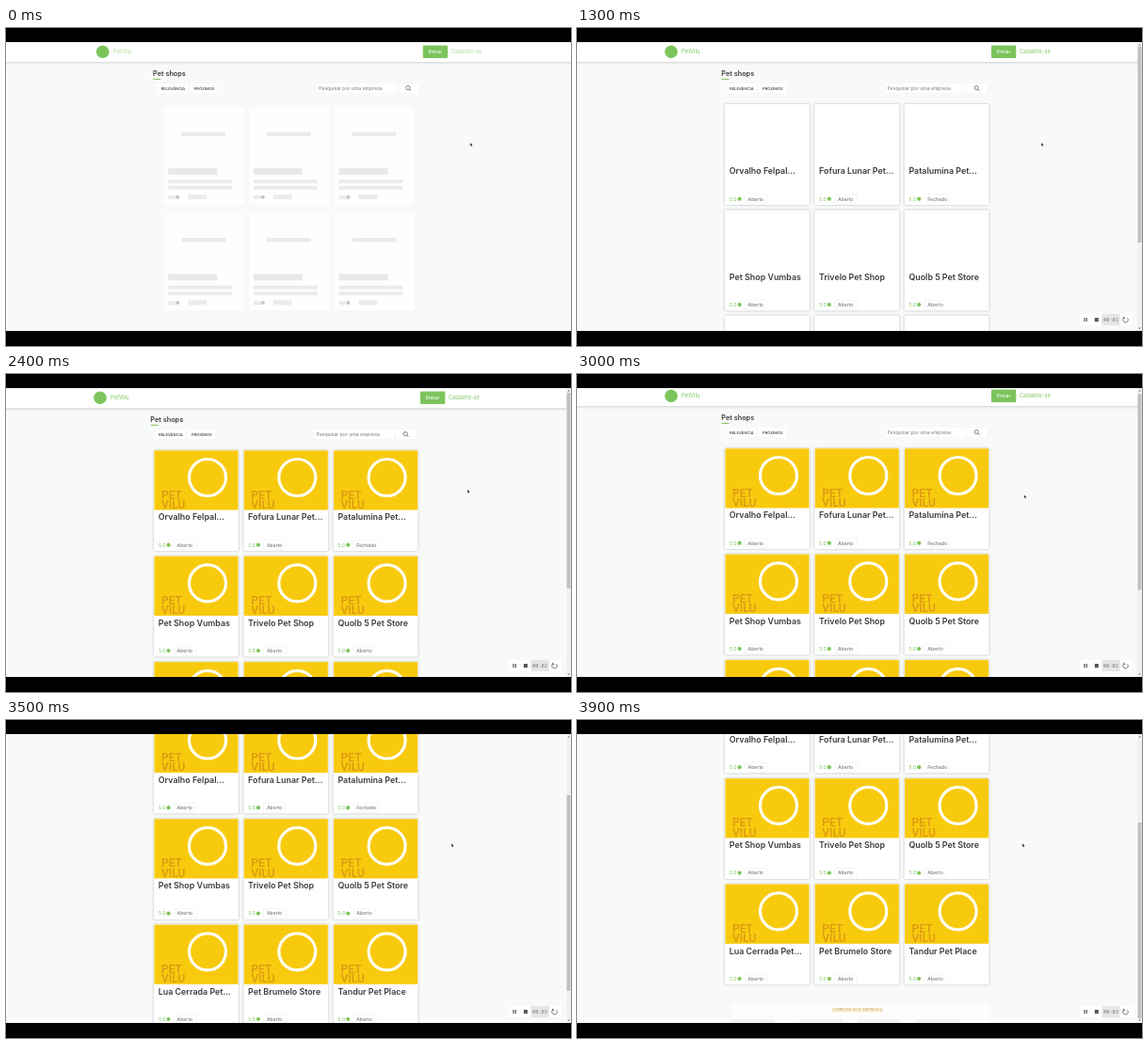
Write an HTML page that moves like this. It is 600 by 338 pixels and loops after 4 s.

```html
<!DOCTYPE html>
<html lang="pt-BR">
<head>
<meta charset="utf-8">
<title>Pet shops</title>
<style>
html, body { margin: 0; width: 100%; height: 100%; overflow: hidden; background: #000; }
svg { display: block; width: 100%; height: 100%; }
text { font-family: Inter, "Open Sans", sans-serif; }
.brand { font-family: Roboto, "Liberation Sans", sans-serif; }
.mono { font-family: "Noto Sans Mono", "DejaVu Sans Mono", monospace; }
.card { filter: drop-shadow(0 .3px 1px rgba(0, 0, 0, .28)); }
.bar { filter: drop-shadow(0 1px 1.5px rgba(0, 0, 0, .16)); }
.soft { filter: drop-shadow(0 0 .6px rgba(0, 0, 0, .08)); }
</style>
</head>
<body>
<svg viewBox="0 0 600 338" xmlns="http://www.w3.org/2000/svg">
  <defs><clipPath id="view"><rect y="15" width="600" height="307"/></clipPath></defs>
  <rect width="600" height="338"/>
  <g clip-path="url(#view)">
    <rect y="15" width="600" height="307" fill="#f8faf9"/>
    <g id="page"></g>
    <g id="scrollbar"></g>
    <g id="panel"></g>
    <path id="cursor" d="M0 0V3.6L.9 2.8 1.5 4.1 2.1 3.8 1.5 2.6H2.6Z" fill="#111" stroke="#fff" stroke-width=".2"/>
  </g>
</svg>
<script>
const LOOP = 4000, STEP = 100;
const PANEL_AT = 300, CARDS_AT = 1100, IMAGES_AT = 1700;
const GREEN = '#7cc45c', DARK = '#3c3c3c';
const SHOPS = [
  'Orvalho Felpal...', 'Fofura Lunar Pet...', 'Patalumina Pet...',
  'Pet Shop Vumbas', 'Trivelo Pet Shop', 'Quolb 5 Pet Store',
  'Lua Cerrada Pet...', 'Pet Brumelo Store', 'Tandur Pet Place'
];
const $ = id => document.getElementById(id);
const clamp = v => Math.max(0, Math.min(1, v));

const rect = (x, y, w, h, fill, more = '') =>
  `<rect x="${x}" y="${y}" width="${w}" height="${h}" fill="${fill}" ${more}/>`;
const dot = (x, y, r, fill, more = '') =>
  `<circle cx="${x}" cy="${y}" r="${r}" fill="${fill}" ${more}/>`;
const text = (x, y, size, fill, str, more = '') =>
  `<text x="${x}" y="${y}" font-size="${size}" fill="${fill}" ${more}>${str}</text>`;

function header() {
  return rect(-10, 0, 620, 36, '#fff', 'class="bar"') +
    dot(100, 25.2, 6.8, GREEN) +
    `<g id="faint">${text(111, 27.2, 5.9, GREEN, 'PetVilu')}
      ${text(470, 27, 5.6, GREEN, 'Cadastre-se')}</g>` +
    rect(440, 18.5, 26.3, 13.5, GREEN, 'rx="1"') +
    text(453.2, 27, 5, '#fff', 'Entrar', 'text-anchor="middle" font-weight="500"');
}

function toolbar() {
  return text(153.3, 51.4, 7.3, DARK, 'Pet shops', 'font-weight="600"') +
    rect(153.5, 53.9, 8, 1, GREEN) +
    rect(158.5, 58.7, 32, 10.8, '#fff', 'class="soft"') +
    rect(193, 58.7, 29, 10.8, '#fff', 'class="soft"') +
    text(162, 65.7, 4.1, DARK, 'RELEVÂNCIA', 'font-weight="500"') +
    text(197, 65.7, 4.1, DARK, 'PRÓXIMOS', 'font-weight="500"') +
    rect(326.5, 58.7, 86, 10.8, '#fff', 'class="soft"') +
    rect(414, 58.7, 21.5, 10.8, '#fff', 'class="soft"') +
    text(329.5, 66, 5.1, '#777', 'Pesquisar por uma empresa') +
    `<g fill="none" stroke="#555" stroke-width=".7"><circle cx="424.2" cy="63.6" r="2.1"/>
      <path d="M425.7 65.1L427.6 67"/></g>`;
}

function picture() {
  return `<g class="pic">${rect(.5, .3, 89, 63.2, '#f8ca0e')}
    ${dot(57, 29, 19.5, 'none', 'stroke="#fffdf2" stroke-width="3.2"')}
    <g class="brand" font-weight="500">
    ${text(8, 51.5, 12, '#dc9812', 'PET', 'class="brand"')}
    ${text(8, 61.8, 12, '#dc9812', 'VILU', 'class="brand"')}</g></g>`;
}

function card(name, i) {
  const x = 157 + i % 3 * 95.3, y = 81 + Math.floor(i / 3) * 112.4;
  const closed = i === 2;
  return `<g transform="translate(${x} ${y})">` +
    rect(0, 0, 90, 107, '#fff', 'rx="1" class="card"') + picture() +
    text(4.8, 74.3, 8.9, DARK, name, 'font-weight="600"') +
    text(5, 102.6, 5.2, GREEN, '5.0') + dot(15.6, 100.7, 2.1, GREEN) +
    rect(21.3, 95.7, closed ? 27 : 24, 10, '#fff', 'stroke="#eee" stroke-width=".6" rx="1"') +
    text(24.6, 102.6, 5.2, '#666', closed ? 'Fechado' : 'Aberto') + '</g>';
}

function ghost(_, i) {
  const x = 164.5 + i % 3 * 90.6, y = 84 + Math.floor(i / 3) * 112.4;
  const bone = '#ebebeb';
  return `<g transform="translate(${x} ${y})">` +
    rect(0, 0, 86, 104, '#fdfefd', 'class="soft"') +
    rect(19, 26.5, 47, 4.5, bone, 'rx="1"') +
    rect(5, 65, 52, 7, '#e9e9e9') +
    rect(5, 77.2, 68, 4, bone) + rect(5, 83.7, 68, 4, bone) +
    rect(5, 94, 8, 4, bone) + dot(15, 95.7, 2, '#c4c4c4') +
    rect(26, 93, 20, 5, bone) + '</g>';
}

function footer() {
  const row = [164, 236, 298, 360].map(x => rect(x, 450, 46, 3, '#f0f1ef')).join('');
  return rect(164, 432.5, 274, 22, '#fdfdfc', 'class="soft"') +
    text(297.5, 440.4, 3.9, '#c89c2c', 'CARREGAR MAIS EMPRESAS', 'text-anchor="middle"') +
    rect(270, 441, 55, .6, '#ecd68e') + row;
}

$('page').innerHTML = header() + toolbar() +
  `<g id="ghosts">${SHOPS.slice(0, 6).map(ghost).join('')}</g>
   <g id="cards">${SHOPS.map(card).join('')}${footer()}</g>`;

$('scrollbar').innerHTML = rect(595, 15, 5, 307, '#f1f1f1') +
  rect(595.5, 20, 4, 208, '#c1c1c1', 'id="thumb"') +
  '<path d="M596.4 18.4L597.6 16.8 598.8 18.4ZM596.4 318.6L597.6 320.2 598.8 318.6Z" fill="#777"/>';

$('panel').innerHTML = rect(534, 304, 56, 12, '#fff', 'rx="1" class="soft"') +
  rect(557.3, 304, 19.4, 12, '#e6e6e6') +
  rect(538.3, 308, 1.2, 4.2, '#555') + rect(540.6, 308, 1.2, 4.2, '#555') +
  rect(549.8, 308, 4, 4.2, '#555') +
  text(567, 312.1, 5.3, '#777', '00:00', 'id="clock" class="mono" text-anchor="middle"') +
  `<path d="M580.5 308.2A2.8 2.8 0 1 0 584.6 308.4M580.9 306.6L580.3 308.5 582.3 308.8"
    fill="none" stroke="#555" stroke-width=".8"/>`;

// Points are [time, value, slope].
function hermite(points, t) {
  if (t <= points[0][0]) return points[0][1];
  for (let i = 1; i < points.length; i++) {
    const [t0, a, m] = points[i - 1], [t1, b, n] = points[i];
    if (t > t1) continue;
    const h = t1 - t0, u = (t - t0) / h, v = 1 - u;
    return a * v * v * (1 + 2 * u) + b * u * u * (3 - 2 * u) + h * u * v * (m * v - n * u);
  }
  return points[points.length - 1][1];
}

const SCROLL = [[2900, 0, 0], [3000, 2, .08], [3300, 45.8, .18], [3500, 88.5, .18], [3900, 131.5, 0]];
const MOUSE_X = [[2300, 493, 0], [2400, 490, -.03], [3000, 474.8, -.01], [3300, 473, 0]];
const MOUSE_Y = [[2300, 122, 0], [2400, 122.8, .01], [3000, 128.5, .01], [3300, 130.5, .003], [3500, 131.3, 0]];

const pics = document.querySelectorAll('.pic');
const show = (el, on) => el.setAttribute('display', on ? 'inline' : 'none');
const move = (el, x, y) => el.setAttribute('transform', `translate(${x} ${y})`);

function draw(ms) {
  const t = Math.floor(ms / STEP) * STEP;
  const loaded = t >= CARDS_AT;
  const scroll = hermite(SCROLL, t);
  move($('page'), loaded ? 0 : 2.7, -scroll);
  move($('thumb'), 0, scroll * .677);
  move($('cursor'), hermite(MOUSE_X, t), hermite(MOUSE_Y, t));
  show($('ghosts'), !loaded);
  show($('cards'), loaded);
  show($('scrollbar'), loaded);
  show($('panel'), t >= PANEL_AT);
  pics.forEach(p => show(p, t >= IMAGES_AT));
  $('faint').setAttribute('opacity', .6 + .4 * clamp((t - 200) / 700));
  $('clock').textContent = '00:0' + Math.max(0, Math.floor((t - 100) / 1000));
}

const start = performance.now();
function tick() {
  draw((performance.now() - start) % LOOP);
  requestAnimationFrame(tick);
}
tick();
</script>
</body>
</html>
```
